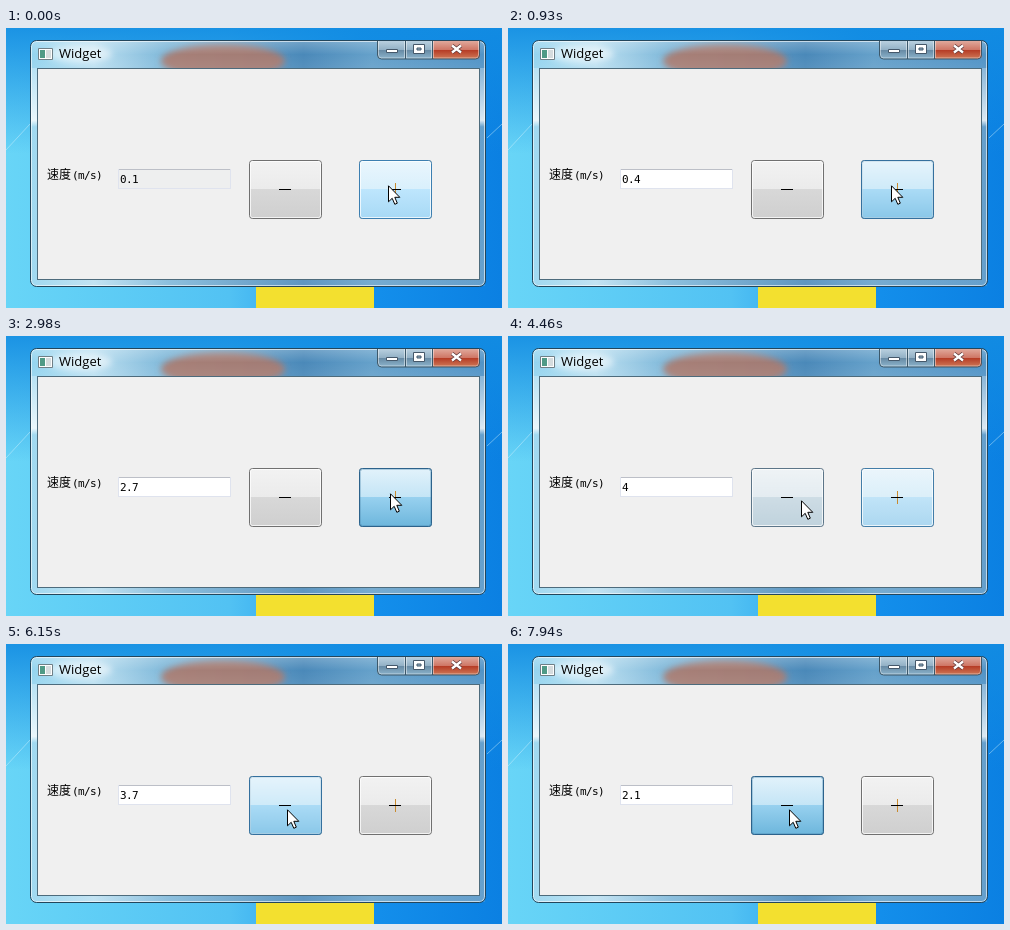
Recreate the animation shown at these times as an HTML page. Size 496 by 280 pixels, loop 8000 ms.

```html
<!DOCTYPE html>
<html lang="zh">
<head>
<meta charset="utf-8">
<title>Widget</title>
<style>
html, body { margin: 0; width: 100%; height: 100%; overflow: hidden; }
svg { display: block; width: 100vw; height: 100vh; }
.mono { font: 11px "DejaVu Sans Mono", "Liberation Mono", monospace; letter-spacing: -.62px; }
.cjk { font: 12px "Noto Sans CJK SC", "Noto Sans CJK", sans-serif; }
.title { font: 13px "Open Sans", "Noto Sans", sans-serif; }
</style>
</head>
<body>
<svg viewBox="0 0 496 280" preserveAspectRatio="none">
  <defs>
    <linearGradient id="sky">
      <stop offset="0" stop-color="#68d5f7"/>
      <stop offset=".45" stop-color="#52c2f3"/>
      <stop offset=".72" stop-color="#1490ec"/>
      <stop offset="1" stop-color="#0b80e2"/>
    </linearGradient>
    <linearGradient id="dusk" x2="0" y2="1">
      <stop offset="0" stop-color="#128ce2" stop-opacity=".9"/>
      <stop offset=".45" stop-color="#128ce2" stop-opacity="0"/>
    </linearGradient>
    <linearGradient id="glass">
      <stop offset="0" stop-color="#8fd2ee"/>
      <stop offset=".14" stop-color="#b8def0"/>
      <stop offset=".3" stop-color="#79b5d8"/>
      <stop offset=".6" stop-color="#4384b6"/>
      <stop offset=".75" stop-color="#5f9dc8"/>
      <stop offset="1" stop-color="#4a8fc4"/>
    </linearGradient>
    <linearGradient id="side" x2="0" y2="1">
      <stop offset="0" stop-color="#fff" stop-opacity=".35"/>
      <stop offset=".24" stop-color="#fff" stop-opacity=".8"/>
      <stop offset=".27" stop-color="#fff" stop-opacity=".15"/>
      <stop offset="1" stop-color="#fff" stop-opacity=".15"/>
    </linearGradient>
    <linearGradient id="sheen" x2="0" y2="1">
      <stop offset="0" stop-color="#fff" stop-opacity=".25"/>
      <stop offset=".5" stop-color="#fff" stop-opacity=".04"/>
      <stop offset="1" stop-color="#fff" stop-opacity=".1"/>
    </linearGradient>
    <linearGradient id="cap" x2="0" y2="1">
      <stop offset="0" stop-color="#b9d0df"/>
      <stop offset=".48" stop-color="#93b1c6"/>
      <stop offset=".5" stop-color="#6689a3"/>
      <stop offset="1" stop-color="#8db5cd"/>
    </linearGradient>
    <linearGradient id="close" x2="0" y2="1">
      <stop offset="0" stop-color="#e0a99c"/>
      <stop offset=".48" stop-color="#cf7766"/>
      <stop offset=".5" stop-color="#b53a24"/>
      <stop offset="1" stop-color="#cf7a58"/>
    </linearGradient>
    <filter id="soft" x="-30%" y="-60%" width="160%" height="220%"><feGaussianBlur stdDeviation="3"/></filter>
    <clipPath id="bar"><path d="M25 40V19q0-6 6-6H473q6 0 6 6V40z"/></clipPath>
  </defs>

  <!-- desktop -->
  <path fill="url(#sky)" d="M0 0H496V280H0z"/>
  <path fill="url(#dusk)" d="M0 0H496V280H0z"/>
  <path stroke="#d5f1fb" stroke-opacity=".45" d="M0 122L24 96M481 110L496 96"/>
  <path fill="#f3e02f" d="M250 162h118v118H250z"/>

  <!-- window frame -->
  <rect x="24.5" y="12.5" width="455" height="246" rx="6" fill="url(#glass)"/>
  <path fill="url(#side)" d="M25 40H479V258H25z"/>
  <g clip-path="url(#bar)">
    <g filter="url(#soft)">
      <ellipse cx="217" cy="33" rx="62" ry="17" fill="#a87468" fill-opacity=".9"/>
      <ellipse cx="74" cy="26" rx="32" ry="9" fill="#fff" fill-opacity=".55"/>
    </g>
    <path fill="url(#sheen)" d="M25 13H479V40H25z"/>
  </g>
  <rect x="25.5" y="13.5" width="453" height="244" rx="5" fill="none" stroke="#fff" stroke-opacity=".6"/>
  <rect x="24.5" y="12.5" width="455" height="246" rx="6" fill="none" stroke="#23465c"/>
  <rect x="31.5" y="40.5" width="442" height="211" fill="#f0f0f0" stroke="#4d6b7c"/>

  <!-- title bar -->
  <path fill="#fdfdfd" stroke="#6f7f86" d="M32.5 20.5h14v11h-14z"/>
  <path fill="#4f9a86" d="M34 22h5v8h-5z"/>
  <path fill="#d5dcde" d="M40 22h5v8h-5z"/>
  <text class="title" x="53" y="30">Widget</text>
  <path fill="url(#cap)" d="M371 13H427V31H375q-4 0-4-4z"/>
  <path fill="url(#close)" d="M427 13H474V27q0 4-4 4H427z"/>
  <path fill="none" stroke="#fff" stroke-opacity=".45" d="M372.5 13V27q0 3 3 3H398.5V13M400.5 13V30H425.5V13M427.5 13V30H470q2.5 0 2.500-3V13"/>
  <path fill="none" stroke="#3c586a" d="M371.5 13V27q0 4 4 4H469.5q4 0 4-4V13M399.5 13V31M426.5 13V31"/>
  <g stroke="#45586a" fill="#fff">
    <path d="M380.5 21.5h11v3h-11z"/>
    <path fill-rule="evenodd" d="M407.5 16.5h11v9h-11zM411 20v2h4v-2z"/>
  </g>
  <path d="M446 17.5l9 7m0-7l-9 7" stroke="#5f3a3a" stroke-width="4"/>
  <path d="M446 17.5l9 7m0-7l-9 7" stroke="#fff" stroke-width="2.3"/>

  <!-- form -->
  <text x="41" y="151"><tspan class="cjk">速度</tspan><tspan class="mono" x="66">(m/s)</tspan></text>
  <rect id="field" x="112.5" y="141.5" width="112" height="19" stroke="#dfe3ee"/>
  <path d="M113 141.5h111" stroke="#b4b7bf" stroke-opacity=".8"/>
  <text id="value" class="mono" x="114" y="155"></text>
  <g id="buttons"></g>
  <path d="M273 161.5h12M383 161.5h12" stroke="#000"/>
  <path d="M389.5 155v13" stroke="#c98a2e"/>
  <path d="M389 161.5h1" stroke="#000"/>
  <path id="cursor" fill="#fff" stroke="#000" d="M.5.8V16.8L4.2 13.3L6.8 19.3L9.3 18.2L6.8 12.3H11.8z"/>
</svg>
<script>
const LOOP = 8000;
const LEAVE = 4330;      // pointer sets off from plus to minus
const REPEAT_DELAY = 280;
const REFRESH = 140;     // screen refresh while a button is held
const PER_REFRESH = 2.5; // repeats per refresh
const NS = "http://www.w3.org/2000/svg";
const $ = id => document.getElementById(id);
const clamp = x => Math.max(0, Math.min(1, x));

// each press: down time, up time
const plusPresses = [[120, 270], [390, 540], [810, 930], [1380, 3750]];
const minusPresses = [[4880, 5000], [5730, 5880], [6000, 6150], [6820, LOOP]];

// border, then top and bottom half gradients
const skins = {
  normal: ["#707070", "#f2f2f2", "#ebebeb", "#d8d8d8", "#cfcfcf"],
  hover: ["#3c7fb1", "#eaf6fd", "#d9f0fc", "#bee6fd", "#a7d9f5"],
  pressed: ["#2c628b", "#e2f2fb", "#c4e5f6", "#98d1ef", "#6db6dc"]
};

function add(parent, tag, attrs) {
  const node = document.createElementNS(NS, tag);
  for (const key in attrs) node.setAttribute(key, attrs[key]);
  return parent.appendChild(node);
}

function addLayer(x, name) {
  const [border, a, b, c, d] = skins[name];
  const [rim, rimOpacity] = name === "pressed" ? ["#4a87ad", .35] : ["#fff", .75];
  const layer = add($("buttons"), "g", {});
  const fill = add(layer, "linearGradient", { id: name + x, x2: 0, y2: 1 });
  [[0, a], [.49, b], [.49, c], [1, d]].forEach(([offset, color]) =>
    add(fill, "stop", { offset, "stop-color": color }));
  add(layer, "rect", { x: x + .5, y: 132.5, width: 72, height: 58, rx: 3, fill: `url(#${name + x})`, stroke: border });
  add(layer, "rect", { x: x + 1.5, y: 133.5, width: 70, height: 56, rx: 2, fill: "none", stroke: rim, "stroke-opacity": rimOpacity });
  return layer;
}

function makeButton(x) {
  const [, hover, pressed] = Object.keys(skins).map(name => addLayer(x, name));
  return (h, p) => {
    hover.setAttribute("opacity", h);
    pressed.setAttribute("opacity", p);
  };
}

const setMinus = makeButton(243);
const setPlus = makeButton(353);

// full while down, then half strength fading out
function pressAmount(presses, t) {
  const last = presses.filter(([down]) => down <= t).pop();
  if (!last) return 0;
  return t < last[1] ? 1 : .5 * clamp(1 - (t - last[1]) / 300);
}

// a click counts on release; a held button repeats
function countSteps(presses, t) {
  return presses.reduce((sum, [down, up]) => {
    const first = down + REPEAT_DELAY;
    if (up < first) return sum + (t >= up);
    if (t < first) return sum;
    const shown = Math.floor((Math.min(t, up) - first) / REFRESH + .02);
    return sum + 1 + Math.floor(shown * PER_REFRESH);
  }, 0);
}

function pointerAt(t) {
  const drift = Math.min(2, Math.round(t / 1250));
  const move = 1 - (1 - clamp((t - LEAVE) / 254)) ** 3;
  return [382 + drift - 103 * move, 157 + 8 * move].map(Math.round);
}

function draw(t) {
  const [x, y] = pointerAt(t);
  const tenths = 1 + countSteps(plusPresses, t) - countSteps(minusPresses, t);
  $("value").textContent = tenths / 10;
  $("field").setAttribute("fill", t < 120 ? "#eeefef" : "#fff");
  $("cursor").setAttribute("transform", `translate(${x} ${y})`);
  setPlus(1 - clamp((t - LEAVE) / 1000), pressAmount(plusPresses, t));
  setMinus(clamp((t - LEAVE) / 350), pressAmount(minusPresses, t));
}

const start = performance.now();
function frame() {
  draw((performance.now() - start) % LOOP);
  requestAnimationFrame(frame);
}
frame();
</script>
</body>
</html>
```
